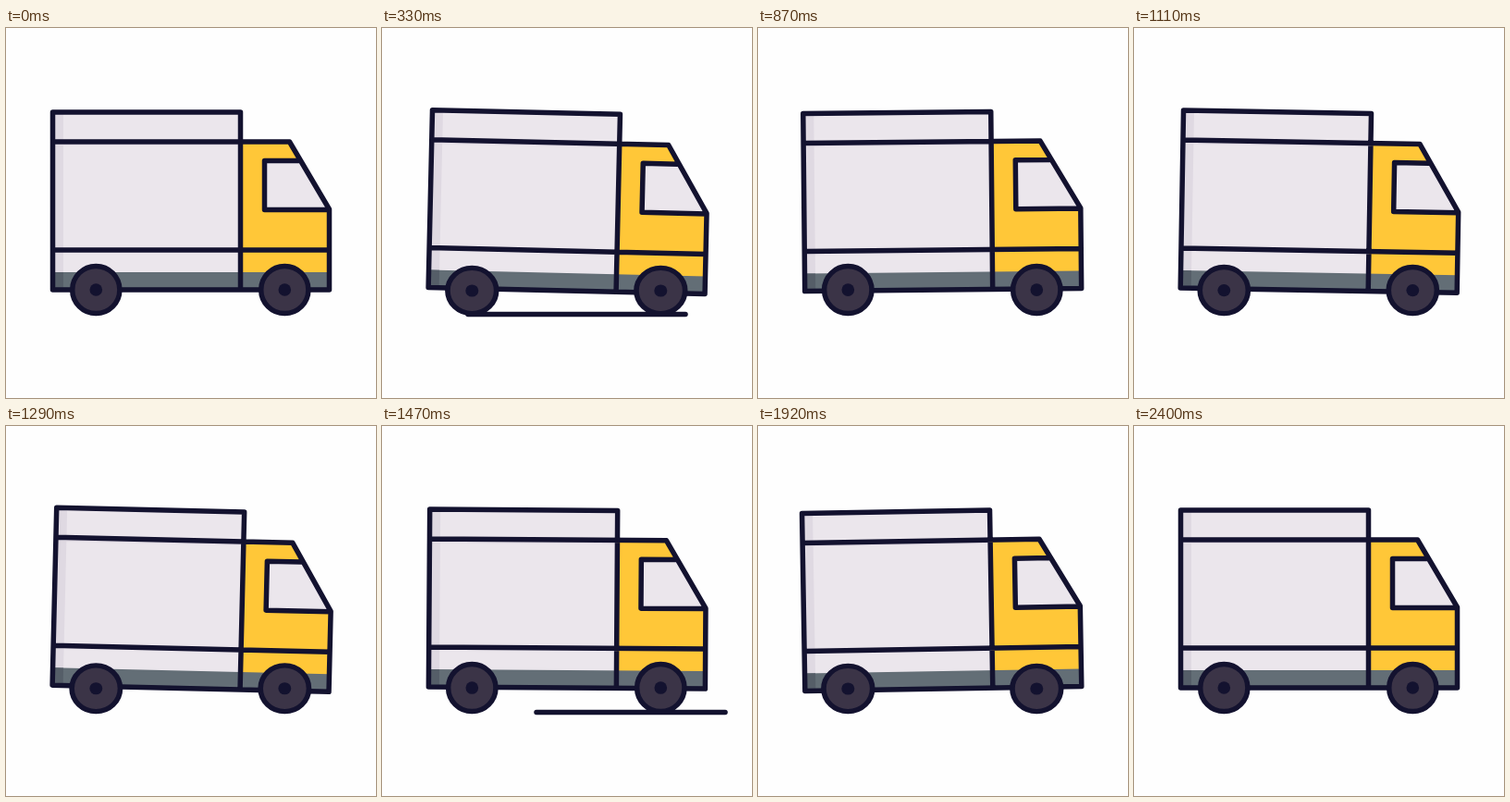
An HTML page for the animation above (4460 ms loop, 400x400 px).

```html
<!DOCTYPE html>
<html lang="en">
<head>
<meta charset="utf-8">
<title>Delivery truck</title>
<style>
  html, body { margin: 0; width: 100%; height: 100%; overflow: hidden; background: #fefefe; }
  svg { display: block; width: 100%; height: 100%; }
  .ink { fill: none; stroke: #13122f; stroke-width: 5.5; stroke-linecap: round; stroke-linejoin: round; }
</style>
</head>
<body>
<svg viewBox="0 0 400 400">
  <defs>
    <g id="wheel">
      <circle class="ink" r="25.6" style="fill:#3b3447"/>
      <circle r="6.8" fill="#13122f"/>
    </g>
  </defs>
  <path id="road" class="ink"/>
  <g id="body">
    <path fill="#ebe6ec" d="M50.5 91H253.5V283H50.5z"/>
    <path fill="#dfd9e2" d="M50.5 91H62V283H50.5zM50.5 123H253.5V127H50.5z"/>
    <path fill="#ffc738" d="M253.5 123H306.5L349.5 196V283H253.5z"/>
    <path fill="#636e76" d="M50.5 264H349.5V283H50.5z"/>
    <path fill="#555e68" d="M50.5 264H62V283H50.5z"/>
    <path fill="#ebe6ec" d="M279.5 143.5H318.5L349.5 196.5H279.5z"/>
    <path class="ink" d="M253.5 123V91H50.5V283H349.5V196L306.5 123H50.5M253.5 123V283M50.5 240H349.5M317 143.5H279.5V196.5H349"/>
  </g>
  <g class="axle"><use href="#wheel"/></g>
  <g class="axle"><use href="#wheel"/></g>
</svg>
<script>
const LOOP = 4460, STEP = 30, END = 2400;
const GROUND = 311, RADIUS = 28;
const road = document.getElementById('road');
const body = document.getElementById('body');
const axles = document.querySelectorAll('.axle');

// [time, value] pairs, eased in and out between neighbours
const tilt = [[0, 0], [280, 1.4], [690, -1.15], [1260, 1.4], [1747, -1.17], [2400, 0]];
const squash = [[0, 0], [330, 1], [740, 0], [1270, .75], [1530, 0], [1920, 1], [2400, 0]];

function at(keys, t) {
  const i = Math.max(1, keys.findIndex(k => k[0] >= t));
  const [t0, a] = keys[i - 1], [t1, b] = keys[i];
  return a + (b - a) * (1 - Math.cos(Math.PI * (t - t0) / (t1 - t0))) / 2;
}

// The front end slows down while the back end speeds up.
function drawRoad(t) {
  const u = t % 1200, d = u - 270;
  const left = 167 - 1.34 * d + .00178 * d * d;
  const right = 371 - .68 * d - .00061 * d * d;
  const visible = u < 700 && left < right;
  road.setAttribute('d', visible ? `M${left} 309.5H${right}` : '');
}

function draw(t) {
  const s = at(squash, t), sy = 1 - .036 * s;
  const drop = RADIUS * (1 - sy);
  body.setAttribute('transform', `translate(0 ${drop}) rotate(${at(tilt, t)} 200 265)`);
  axles.forEach((axle, i) => axle.setAttribute('transform',
    `translate(${97.3 + 204 * i} ${GROUND - RADIUS * sy}) scale(${1 + .03 * s} ${sy})`));
  drawRoad(t);
}

const start = performance.now();
function frame(now) {
  const t = Math.max(0, now - start) % LOOP;
  draw(Math.min(END, Math.floor(t / STEP) * STEP));
  requestAnimationFrame(frame);
}
draw(0);
requestAnimationFrame(frame);
</script>
</body>
</html>
```
